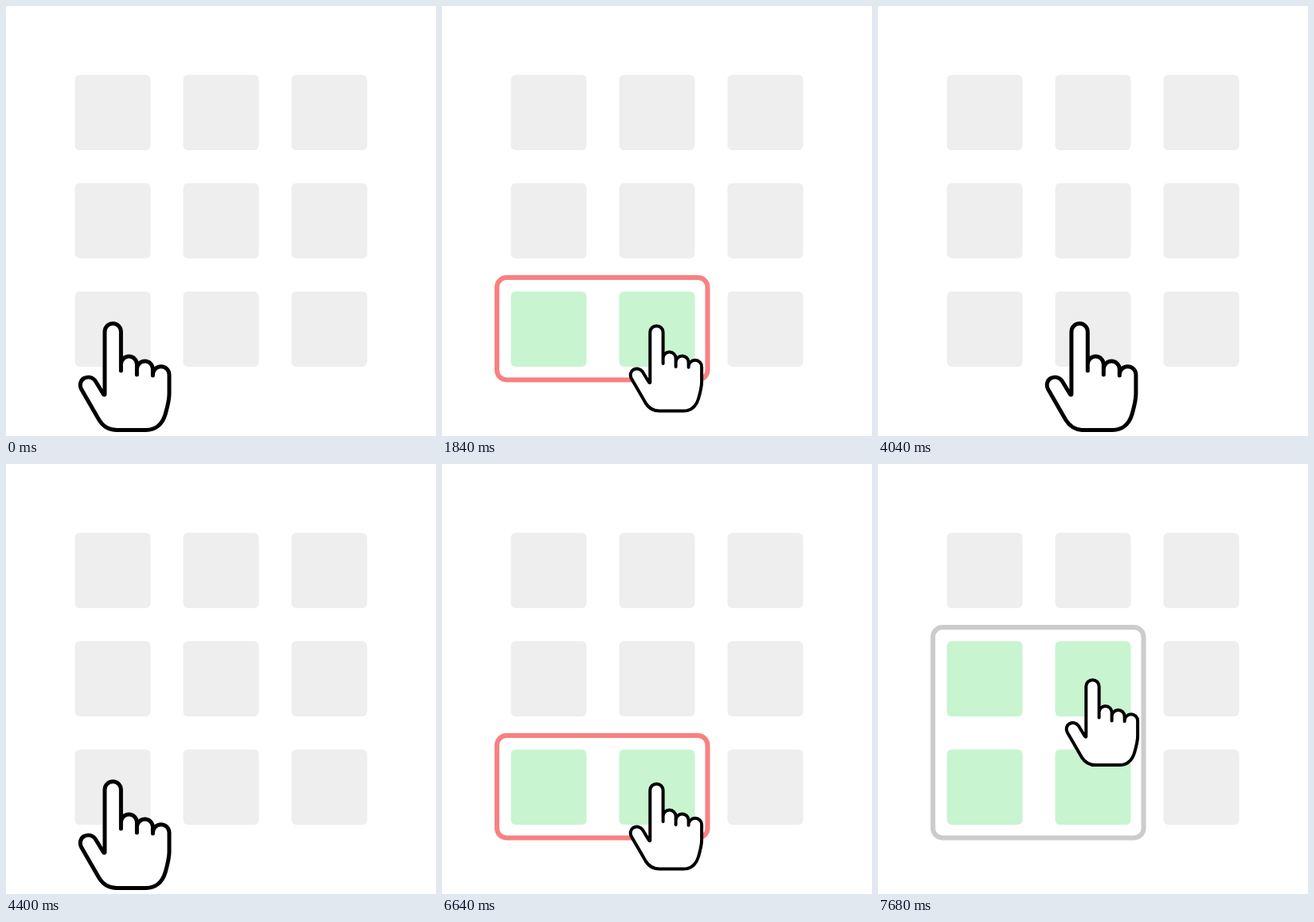
An HTML page for the animation above (8 s loop, 540x540 px).

```html
<!DOCTYPE html>
<html lang="en">
<head>
<meta charset="utf-8">
<title>Grid selection</title>
<style>
  html, body { margin: 0; height: 100%; overflow: hidden; background: #fff; }
  svg { display: block; width: 100vw; height: 100vh; }
</style>
</head>
<body>
<svg viewBox="0 0 540 540">
  <g id="grid"></g>
  <rect id="frame" x="69" rx="12" fill="none" stroke-width="6"/>
  <path id="hand" fill="#fff" stroke="#000" stroke-width="5" stroke-linecap="round" stroke-linejoin="round"
    d="M-10 75V-4A10.2 10.2 0 0 1 10.4 -4V45V37A10 10 0 0 1 30.4 37V50V43A10 10 0 0 1 50.4 43V51V50A10.3 10.3 0 0 1 71 50V74C71 82 68 93 66 100C62 113 53 119.5 42 119.5H5C-5 119.5 -12 115 -17 107L-39.5 68C-42 63 -40.5 57 -36 54.5C-31 52 -25.5 53 -22 57.5L-12 74Q-11 75.5 -10 75Z"/>
</svg>
<script>
const LOOP = 8000, STEP = 40, PITCH = 136;
const START = { x: 134, y: 413 }, REACH = { x: 135.3, y: 130.5 };
const grid = document.getElementById('grid');
const frame = document.getElementById('frame');
const hand = document.getElementById('hand');

const set = (el, attrs) => {
  for (const name in attrs) el.setAttribute(name, attrs[name]);
};

const cells = Array.from({ length: 9 }, (_, i) => {
  const col = i % 3, row = 2 - Math.floor(i / 3);
  const el = document.createElementNS('http://www.w3.org/2000/svg', 'rect');
  set(el, { x: 86.5 + col * PITCH, y: 358.5 - row * PITCH, width: 95, height: 94.5, rx: 6 });
  grid.append(el);
  return { el, col, row };
});

const ramp = (t, from, to) => Math.min(1, Math.max(0, (t - from) / (to - from)));
const glide = (t, from, to) => {
  const p = ramp(t, from, to);
  return p * (1.15 + p * (0.7 - 0.85 * p));
};

function draw(now) {
  const t = Math.floor(now % LOOP / STEP) * STEP;
  const right = glide(t, 1200, 1840) - glide(t, 4000, 4400) + glide(t, 6000, 6640);
  const up = glide(t, 7040, 7680);
  const press = ramp(t, 400, 480) - ramp(t, 2320, 2400) + ramp(t, 5200, 5280);
  const x = START.x + REACH.x * right, y = START.y - REACH.y * up;

  // The selection snaps to whole cells as the fingertip enters them.
  const held = (t >= 440 && t < 2360) || t >= 5240;
  const cols = x > 222 ? 2 : 1, rows = y < 317 ? 2 : 1;
  for (const { el, col, row } of cols && cells) {
    set(el, { fill: held && col < cols && row < rows ? '#c8f4d0' : '#eee' });
  }
  set(frame, {
    visibility: held ? 'visible' : 'hidden',
    stroke: cols * rows === 4 ? '#ccc' : '#f98080',
    y: 341 - (rows - 1) * PITCH,
    width: 128.5 + (cols - 1) * PITCH,
    height: 128.5 + (rows - 1) * PITCH
  });
  set(hand, { transform: `translate(${x} ${y}) scale(${1 - 0.2 * press})` });
}

const begin = performance.now();
function tick() {
  draw(performance.now() - begin);
  requestAnimationFrame(tick);
}
tick();
</script>
</body>
</html>
```
